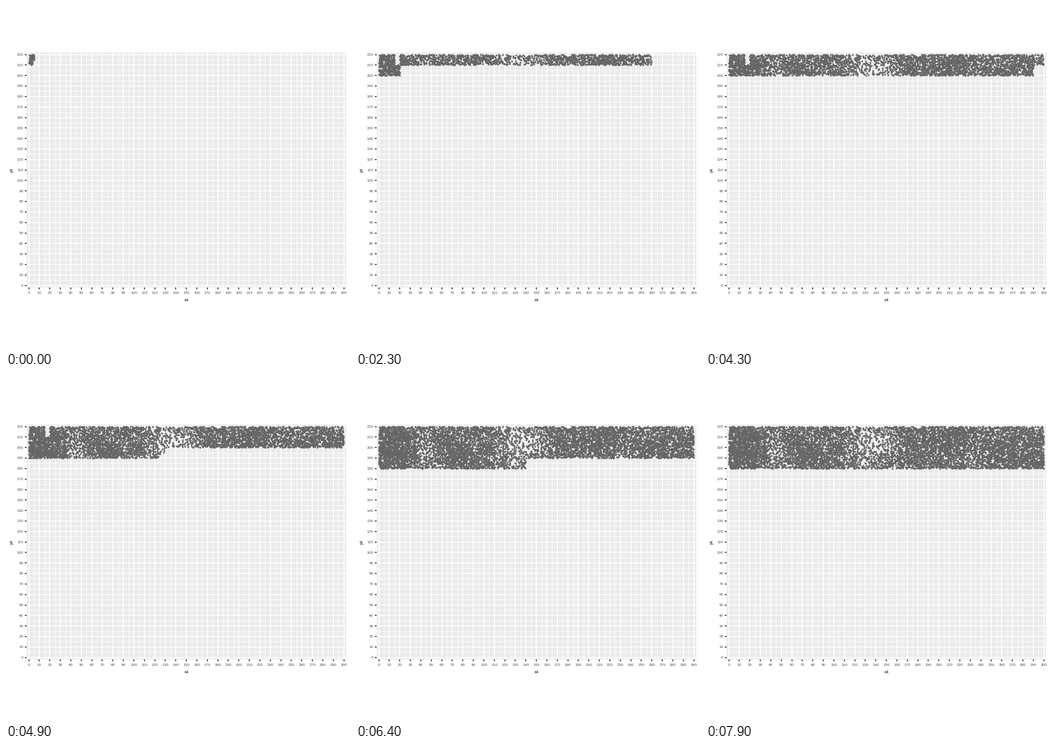
Write a matplotlib script that moves like this. It is 748 px wide and 748 px high and loops after 8 s.

```python
import numpy as np
import matplotlib.pyplot as plt
from matplotlib.animation import FuncAnimation
from matplotlib.patches import Rectangle

SIZE, DPI = 748, 88
FRAMES, STEP = 80, 100
PX = 72 / DPI                      # one pixel in points
LEFT, RIGHT, TOP, BOTTOM = 45, 740, 101, 612
QUAD = 5                           # quadrat side in data units

plt.rcParams["font.family"] = "Liberation Sans"

# Survey progress along each 10-unit strip: (x reached, frame)
STRIPS = [
    [(5, 0), (197.5, 12), (240, 18), (260, 23), (300, 28)],
    [(0, 18), (20, 22), (20.1, 27), (300, 43.57)],
    [(0, 43.4), (15, 45), (270, 54), (285, 55), (300, 57)],
    [(0, 56.5), (140, 64), (195, 72), (300, 79)],
]
SKIPPED_COL, SKIPPED_UNTIL = 3, 60   # column of the first strip done late

# Thickets and clearings: x, y, x radius, y radius, points gained
BASE = 19
PATCHES = [
    (10, 200, 22, 25, 16),
    (43, 195, 11, 30, -10),
    (82, 193, 18, 12, 8),
    (135, 203, 27, 30, -13),
    (205, 203, 18, 12, 6),
    (232, 188, 6, 9, -14),
    (282, 188, 30, 14, 8),
]


def sx(x):
    return 49.6 + x * 685 / 300


def sy(y):
    return 607.6 - y * 502 / 220


def density(x, y):
    bumps = (gain * np.exp(-((x - cx) / rx) ** 2 - ((y - cy) / ry) ** 2)
             for cx, cy, rx, ry, gain in PATCHES)
    return max(2, BASE + sum(bumps))


def make_points(seed=4):
    rng = np.random.default_rng(seed)
    xs, ys, births = [], [], []
    for strip, track in enumerate(STRIPS):
        reach, when = zip(*track)
        for k in range(120):
            col, half = divmod(k, 2)
            x, y = col * QUAD, 215 - strip * 10 - half * QUAD
            born = np.ceil(np.interp((k + 1) * QUAD / 2, reach, when) - 1e-6)
            if strip == 0 and col == SKIPPED_COL:
                born = SKIPPED_UNTIL
            n = rng.poisson(density(x + QUAD / 2, y + QUAD / 2))
            xs.append(x + QUAD * rng.random(n))
            ys.append(y + QUAD * rng.random(n))
            births.append(np.full(n, born))
    xs, ys, births = map(np.concatenate, (xs, ys, births))
    order = np.argsort(births, kind="stable")
    return sx(xs[order]), sy(ys[order]), births[order]


fig = plt.figure(figsize=(SIZE / DPI, SIZE / DPI), dpi=DPI, facecolor="white")
ax = fig.add_axes([0, 0, 1, 1])
ax.set(xlim=(0, SIZE), ylim=(SIZE, 0))
ax.axis("off")


def draw_grid(step, width):
    style = dict(colors="white", linewidths=width * PX, zorder=1)
    ax.vlines(sx(np.arange(0, 301, step)), TOP, BOTTOM, **style)
    ax.hlines(sy(np.arange(0, 221, step)), LEFT, RIGHT, **style)


def label(x, baseline, text, size=8.2, color="#4d4d4d", ha="center", **kw):
    ax.text(x, baseline, text, color=color, fontsize=size * PX,
            ha=ha, va="baseline", **kw)


ax.add_patch(Rectangle((LEFT, TOP), RIGHT - LEFT, BOTTOM - TOP,
                       fc="#ebebeb", ec="none", zorder=0))
draw_grid(5, 1)
draw_grid(10, 2)

tick = dict(colors="#333333", linewidths=2 * PX, zorder=1)
tx, ty = np.arange(0, 301, 10), np.arange(0, 221, 10)
ax.vlines(sx(tx), BOTTOM, BOTTOM + 4, **tick)
ax.hlines(sy(ty), LEFT - 4, LEFT, **tick)
for v in tx:
    label(sx(v), 626, str(v))
for v in ty:
    label(37.6, sy(v) + 2.4, str(v), ha="right")
label(392.5, 642, "x4", 9, "black")
label(15, 357, "y4", 9, "black", rotation=90, rotation_mode="anchor")

px, py, born = make_points()
dots, = ax.plot([], [], "o", ms=4 * PX, mfc="#666666", mec="none", zorder=3)


def draw(i):
    n = np.searchsorted(born, i, side="right")
    dots.set_data(px[:n], py[:n])
    return dots,


anim = FuncAnimation(fig, draw, frames=FRAMES, init_func=lambda: draw(0),
                     interval=STEP, repeat=True, repeat_delay=0, blit=True)
plt.show()
```
